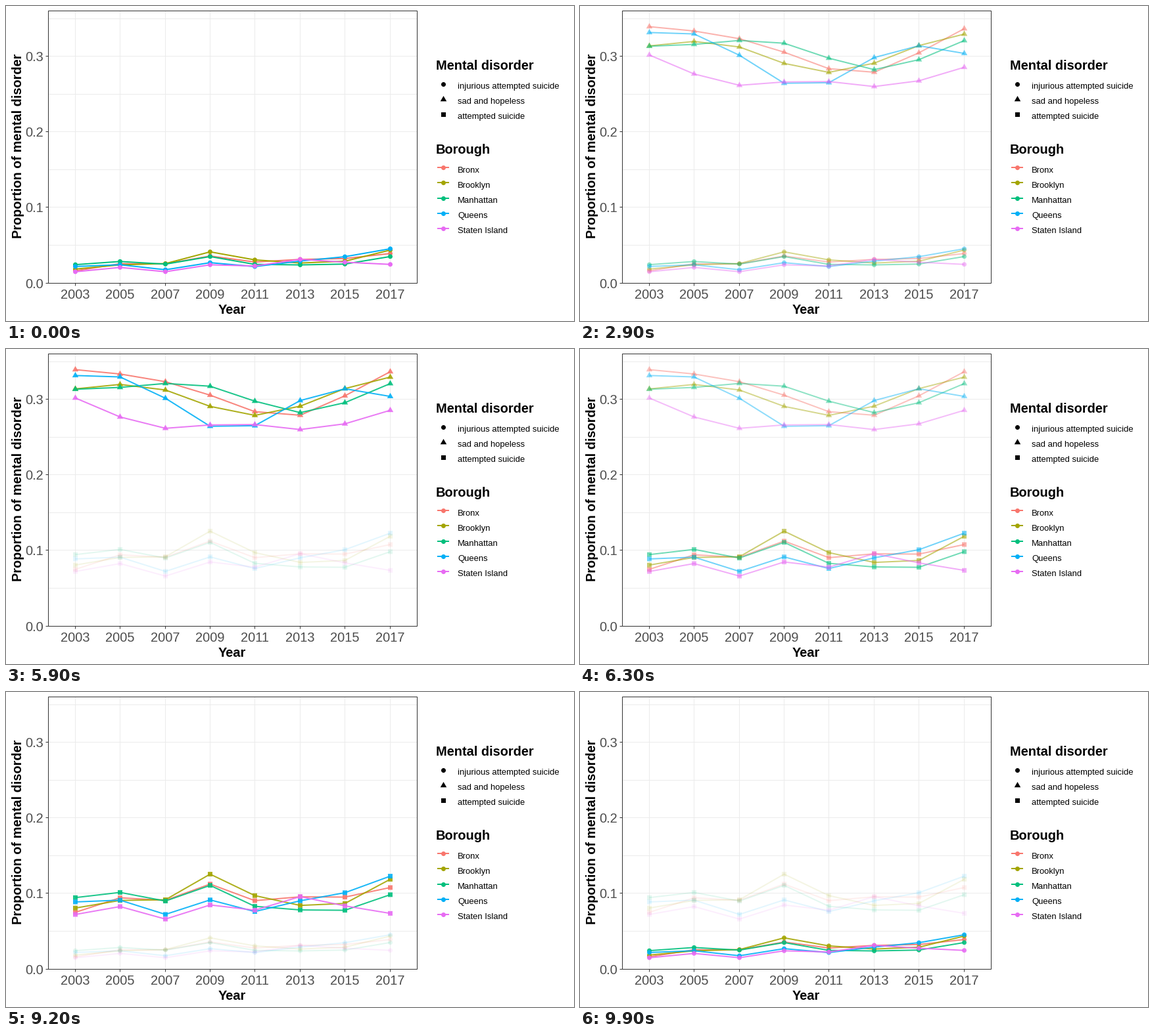
A matplotlib script for the animation above (10000 ms loop, 864x480 px).

```python
import matplotlib.pyplot as plt
from matplotlib.animation import FuncAnimation
from matplotlib.patches import Rectangle
from matplotlib.path import Path
import numpy as np

W, H, DPI = 864, 480, 96
PX = 72 / DPI  # points per pixel
FRAMES, INTERVAL = 100, 100
FADE_STARTS, FADE_STEPS = (24, 58, 91), 9

GREY, GRID, TICK = "#333333", "#EBEBEB", "#4D4D4D"
LEFT, TOP, RIGHT, BOTTOM = 64.5, 7.5, 625.5, 422.5
TRIANGLE = Path([(0, 1), (-0.866, -0.5), (0.866, -0.5), (0, 1)], closed=True)
MARKERS = [("o", 7), (TRIANGLE, 11), ("s", 7)]
DISORDERS = ["injurious attempted suicide", "sad and hopeless", "attempted suicide"]

# Per borough: colour, then level and cosine amplitudes (in pixels)
# of the "sad" and the "attempted" curve
BOROUGHS = {
    "Bronx": ("#F8766D", (361, 16, 27, -17, 5), (110, -9, -5, -10, 2)),
    "Brooklyn": ("#A3A500", (353, 1, 23, -12, -5), (112, -7, -6, -16, 14)),
    "Manhattan": ("#00BF7D", (355, 10, 6, -17, 7), (106, 8, 1, -10, 8)),
    "Queens": ("#00B0F6", (347, 12, 33, 5, -16), (106, -14, 15, -5, 5)),
    "Staten Island": ("#E76BF3", (315, 7, 17, 3, 11), (92, -5, -4, 7, -4)),
}

STEP = np.arange(8)
YEARS = 2003 + 2 * STEP
YEAR_X = np.floor(105.3 + 68.4 * STEP) + 0.5

plt.rcParams["font.family"] = "Liberation Sans"
plt.rcParams["path.snap"] = False
fig = plt.figure(figsize=(W / DPI, H / DPI), dpi=DPI, facecolor="white")
ax = fig.add_axes([0, 0, 1, 1])
ax.set_xlim(0, W)
ax.set_ylim(H, 0)
ax.axis("off")


def text(x, y, s, size=20, **kw):
    return ax.text(x, y, s, fontsize=size * PX, va="baseline", **kw)


def line(x, y, color, width=1, z=1):
    return ax.plot(x, y, color=color, lw=width * PX, zorder=z,
                   solid_capstyle="butt", solid_joinstyle="round")[0]


def points(x, y, color, marker):
    shape, size = marker
    return ax.scatter(x, y, s=(size * PX) ** 2, marker=shape, facecolor=color,
                      edgecolors="none", zorder=4)


def grid_y(value):
    return np.floor(BOTTOM - 0.5 - value * 1151) + 0.5


def waves(amps, first=0):
    return sum(a * np.cos(np.pi * k * (STEP + 0.5) / len(STEP))
               for k, a in enumerate(amps, first))


def draw_panel():
    for i in range(1, 8):
        y = grid_y(i / 20)
        line([LEFT, RIGHT], [y, y], GRID)
    for i in range(4):
        y = grid_y(i / 10)
        line([LEFT - 4, LEFT], [y, y], GREY)
        text(57, y + 7.5, f"{i / 10:.1f}", color=TICK, ha="right")
    for x, year in zip(YEAR_X, YEARS):
        line([x, x], [TOP, BOTTOM], GRID)
        line([x, x], [BOTTOM, BOTTOM + 4], GREY)
        text(x, 446, str(year), color=TICK, ha="center")
    ax.add_patch(Rectangle((LEFT, TOP), RIGHT - LEFT, BOTTOM - TOP, fill=False,
                           ec=GREY, lw=PX, zorder=5))
    text(343.5, 469, "Year", weight="bold", ha="center")
    text(24, 213.5, "Proportion of mental disorder", weight="bold", ha="center",
         rotation=90, rotation_mode="anchor")


def draw_legend():
    text(654, 97, "Mental disorder", weight="bold")
    for i, (name, marker) in enumerate(zip(DISORDERS, MARKERS)):
        points(665.5, 119.5 + 23 * i, "black", marker)
        text(687, 126 + 23 * i, name, 13)
    text(654, 225, "Borough", weight="bold")
    for i, (name, (color, *_)) in enumerate(BOROUGHS.items()):
        y = np.floor(246.5 + 23.25 * i)
        line([656, 674], [y, y], color, 2)
        points(665.5, y + 0.5, color, MARKERS[0])
        text(687, 254 + 23 * i, name, 13)


def draw_series():
    groups = [[], [], []]
    ripple = waves((-3, -9), first=6)  # zigzag shared by all boroughs
    for color, sad_amps, attempt_amps in BOROUGHS.values():
        attempted = waves(attempt_amps) + ripple
        injurious = 0.42 * attempted - 17.5 + 1.5 * STEP
        curves = injurious, waves(sad_amps), attempted
        for group, height, marker in zip(groups, curves, MARKERS):
            y = BOTTOM - height
            group += [line(YEAR_X, y, color, 2, z=3), points(YEAR_X, y, color, marker)]
    return groups


draw_panel()
draw_legend()
groups = draw_series()


def update(frame):
    a, b, c = (min(max((frame - s) / FADE_STEPS, 0), 1) for s in FADE_STARTS)
    for group, alpha in zip(groups, (1 - a + c, a - b, b - c)):
        for artist in group:
            artist.set_visible(alpha > 0)
            artist.set_alpha(alpha)
    return sum(groups, [])


anim = FuncAnimation(fig, update, frames=FRAMES, interval=INTERVAL,
                     init_func=lambda: update(0), repeat=True, repeat_delay=0)
plt.show()
```
